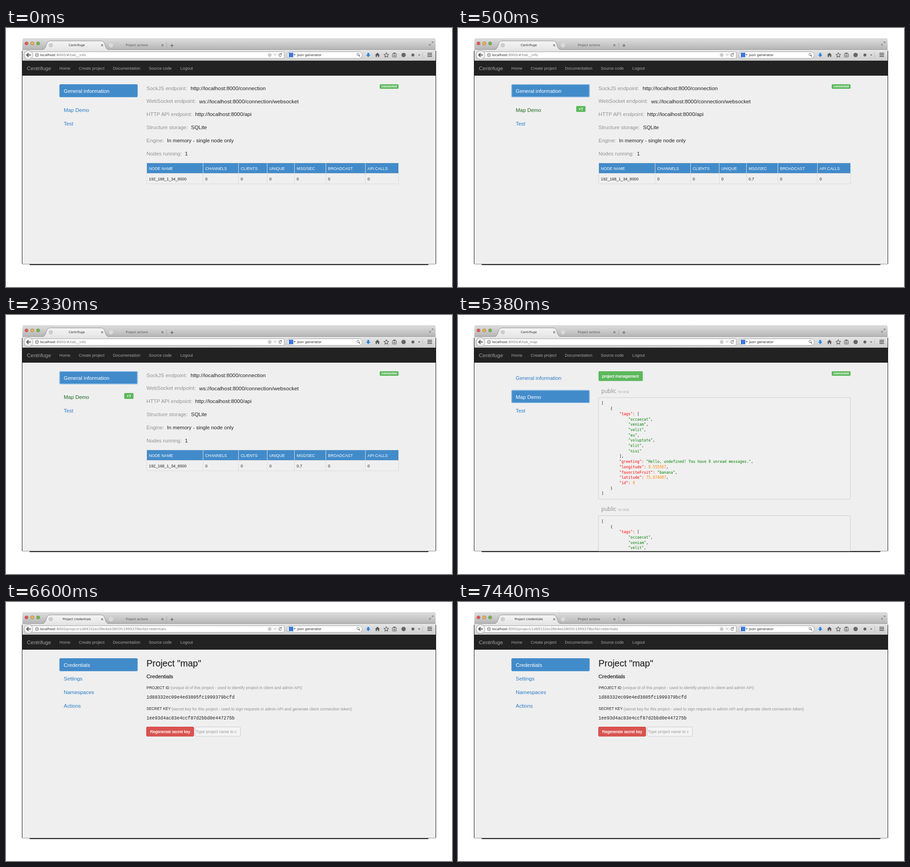
An HTML page for the animation above (8 s loop, 981 by 571 pixels).

```html
<!DOCTYPE html>
<html lang="en">
<meta charset="utf-8">
<title>Centrifuge admin</title>
<style>
  html, body { margin: 0; width: 100%; height: 100%; overflow: hidden; background: #fff; }
  svg { display: block; width: 981px; height: 571px; }
  text { white-space: pre; }
  .sans { font-family: "Liberation Sans", Arial, sans-serif; }
  .ui { font-family: "DejaVu Sans", sans-serif; }
  .head { font-family: "Open Sans", sans-serif; }
  .code { font-family: "DejaVu Sans Mono", monospace; }
  .key { font-family: "Liberation Mono", monospace; }
  .bold { font-weight: bold; }
  .medium { stroke: currentColor; stroke-width: .25; }
</style>
<svg viewBox="0 0 981 571">
  <defs>
    <linearGradient id="strip" x2="0" y2="1"><stop stop-color="#dedede"/><stop offset="1" stop-color="#b4b4b4"/></linearGradient>
    <linearGradient id="bar" x2="0" y2="1"><stop stop-color="#e6e6e6"/><stop offset="1" stop-color="#cecece"/></linearGradient>
    <linearGradient id="tab" x2="0" y2="1"><stop stop-color="#f4f4f4"/><stop offset="1" stop-color="#e6e6e6"/></linearGradient>
    <clipPath id="page"><path d="M36 105H945V520.5H36Z"/></clipPath>
  </defs>
  <g id="chrome"></g>
  <g id="view" clip-path="url(#page)"></g>
  <g id="address"></g>
</svg>
<script>
const BLUE = '#428bca', LINK = '#2a7cc7', GREEN = '#5cb85c', DARK = '#222', GREY = '#929292';
const STARTS = [0, 500, 3550, 6600], LOOP = 8000;

// y is the middle of the capital letters
const text = (str, x, y, size, color = DARK, cls = 'sans', anchor = 'start') =>
  `<text class="${cls}" x="${x}" y="${y + size * .36}" font-size="${size}" fill="${color}" color="${color}" text-anchor="${anchor}">${str}</text>`;
const rect = (x, y, w, h, fill, r = 0, stroke = 'none') =>
  `<rect x="${x}" y="${y}" width="${w}" height="${h}" rx="${r}" fill="${fill}" stroke="${stroke}"/>`;
const circle = (x, y, r, fill, stroke = 'none') =>
  `<circle cx="${x}" cy="${y}" r="${r}" fill="${fill}" stroke="${stroke}" stroke-width=".8"/>`;
const line = (d, color, width = 1) => `<path d="${d}" fill="none" stroke="${color}" stroke-width="${width}"/>`;
const shape = (d, fill) => `<path d="${d}" fill="${fill}"/>`;

function chrome() {
  const lights = ['#ef5350', '#f3b63c', '#6abf45'];
  const nav = [['Home', 117.5], ['Create project', 160], ['Documentation', 235], ['Source code', 314], ['Logout', 383.5]];
  const closeTab = x => line(`M${x - 2} 36l4 4m0-4l-4 4`, '#777', 1.2);
  return shape('M36 48V27Q36 23 40 23H941Q945 23 945 27V48Z', 'url(#strip)')
    + line('M37 23.5H944', '#c9c9c9')
    + rect(36, 47, 909, 25, 'url(#bar)')
    + line('M36 47.5H945', '#979797')
    + shape('M80 48C91 47 86 28.5 97 28.5H209C221 28.5 215 47 226 48Z', 'url(#tab)')
    + line('M80 47.5C91 46.5 86 28.5 97 28.5H209C221 28.5 215 46.5 226 47.5', '#929292')
    + line('M353.5 32V45', '#aaa')
    + lights.map((c, i) => circle(45 + i * 12.8, 34, 3.6, c, '#8a6d62')).join('')
    + circle(98.5, 38, 4.8, '#cdcdcd') + circle(231, 38, 4.8, '#d9d9d9')
    + closeTab(211.5) + closeTab(344)
    + text('Project actions', 263.5, 38, 6.7, '#555', 'ui')
    + line('M361.5 38.5h7m-3.5-3.5v7', '#555', 1.2)
    + line('M931.5 38l3-3m1.5-1.5l3-3M931.5 35v3h3M936.500 30.500h3v3', '#777')
    // address field and its buttons
    + rect(55, 52.5, 557, 14.500, '#fff', 2, '#a5a5a5')
    + circle(49.5, 59.5, 9.8, '#f0f0f0', '#888')
    + line('M54.500 59.500H45.500m4-4l-4 4l4 4', '#555', 1.9)
    + circle(68, 59.5, 3.8, '#bbb', '#777') + line('M64.500 59.500h7M68 56v7', '#eee', .7)
    + circle(580, 59.500, 4.2, '#ccc')
    + line('M589 57.500h5.500l-2.700 4Z', '#aaa', .8)
    + line('M605.500 57.500a3 3 0 1 0 .5 3M606 55v3h-3', '#666', 1.1)
    + rect(618.5, 52.5, 165, 14.500, '#fff', 7, '#a5a5a5')
    + rect(622, 54.5, 10, 10, '#3f78d8')
    + shape('M633 58h4l-2 2.500Z', '#444')
    + text('json generator', 640, 59.500, 7.4, DARK, 'ui')
    + circle(774.3, 58.300, 2.5, 'none', '#444') + line('M776 60l2.500 2.700', '#444', 1.4)
    // toolbar icons
    + shape('M794.800 55h4v4h2.700l-4.700 5.200l-4.700-5.200h2.700Z', '#2584e0')
    + shape('M817 54.500l5.300 5h-1.500v4.500h-2.500v-3h-2.600v3h-2.500v-4.500h-1.500Z', '#5b5b5b')
    + line('M836.500 54.500l1.500 3.300l3.500.4l-2.600 2.400l.7 3.500l-3.100-1.700l-3.100 1.700l.7-3.500l-2.600-2.400l3.500-.4Z', '#555', 1.1)
    + rect(850, 56, 8.500, 8, 'none', 1, '#555') + rect(852, 54.500, 4.500, 2.500, '#555') + line('M852 59.500h4.500M852 61.700h4.500', '#555')
    + circle(874.500, 59.500, 4.8, '#666')
    + circle(895, 59.500, 3.2, '#666')
    + shape('M906.500 58.500h4.500l-2.200 2.700Z', '#555')
    + line('M916.500 53V66', '#bbb')
    + line('M927 55.700h10M927 59.200h10M927 62.700h10', '#555', 1.8)
    // page ground, navigation bar and window edge
    + rect(36, 105, 909, 416, '#efefef')
    + rect(36, 72, 909, 33, DARK) + line('M36 104.500H945', '#111')
    + text('Centrifuge', 46, 89, 11.5, '#a2a2a2')
    + nav.map(([label, x]) => text(label, x, 89, 9, '#a2a2a2')).join('')
    + line('M35.500 50V520M945.500 50V520', '#111')
    + line('M36 520.500H53M928 520.500H945', '#777', .8)
    + line('M52 521.500H929', '#000', 2);
}

function menu(items, active, focused) {
  return items.map(([label, y, color = LINK]) => {
    const on = label === active, top = y - 15;
    return (on ? rect(117.500, top, 172, 28.500, BLUE, 2.5) : '')
      + (on && focused ? rect(118.300, top + .8, 170.400, 26.900, 'none', 2, '#9cc8ee') : '')
      + text(label, 127, y, 11.45, on ? '#fff' : color);
  }).join('');
}

const connected = rect(822, 124, 41.500, 10, GREEN, 2) + text('connected', 842.700, 128.700, 6.8, '#fff', 'sans bold', 'middle');

function info(updated) {
  const rows = [
    ['SockJS endpoint:', 'http://localhost:8000/connection', 406, 11.75],
    ['WebSocket endpoint:', 'ws://localhost:8000/connection/websocket', 425, 11.75],
    ['HTTP API endpoint:', 'http://localhost:8000/api', 416, 11.75],
    ['Structure storage:', 'SQLite', 407, 11.45],
    ['Engine:', 'In memory - single node only', 354, 11.45],
    ['Nodes running:', '1', 393.500, 11.45]
  ];
  const table = [
    ['NODE NAME', '192_168_1_34_8000', 309], ['CHANNELS', 0, 433], ['CLIENTS', 0, 511], ['UNIQUE', 0, 574],
    ['MSG/SEC', updated ? 0.7 : 0, 634], ['BROADCAST', 0, 703], ['API CALLS', 0, 790]
  ];
  const items = [['General information', 139], ['Map Demo', 180.500, updated ? '#1b691f' : LINK], ['Test', 210.500]];
  return menu(items, 'General information', updated) + connected
    + (updated ? rect(260, 172, 20.500, 13, GREEN, 2) + text('+7', 270.200, 178.500, 8.5, '#fff', 'sans bold', 'middle') : '')
    + rows.map(([label, value, x, size], i) =>
        text(label, 309, 132.500 + i * 28.8, 11.45, GREY) + text(value, x, 132.500 + i * 28.8, size)).join('')
    + rect(309, 297, 554.500, 24, BLUE)
    + table.map(([title, value, x]) => line(`M${x + .5} 297V344`, '#dcdcdc')
        + text(title, x + 5.3, 309.500, 8.75, '#fff') + text(value, x + 5.3, 333, 8.75)).join('')
    + line('M309 297.500H863.500M309 320.500H863.500M309 343.500H863.500M863.500 297V344', '#dcdcdc');
}

const message = [{
  tags: ['occaecat', 'veniam', 'velit', 'eu', 'voluptate', 'elit', 'nisi'],
  greeting: 'Hello, undefined! You have 6 unread messages.',
  longitude: 9.555567, favoriteFruit: 'banana', latitude: 75.074087, id: 0
}];

function highlight(row) {
  return row.replace(/("[^"]*":)|("[^"]*")|\b\d[\d.]*/g, (token, key, string) =>
    `<tspan fill="${key ? '#f00' : string ? '#008000' : '#ff8c00'}">${token}</tspan>`);
}

function messageBlock(y) {
  return text('public', 315, y, 11.7, '#8c8c8c', 'head') + text('10:14:52', 351.500, y + 2, 6.3, '#999', 'head')
    + rect(309, y + 14.500, 554, 224, '#f0f0f0', 2, '#ccc')
    + JSON.stringify(message, null, 4).split('\n')
        .map((row, i) => text(highlight(row), 315.500, y + 27 + i * 11.7, 8.17, DARK, 'code')).join('');
}

function messages() {
  return menu([['General information', 139], ['Map Demo', 180.500], ['Test', 210.500]], 'Map Demo', true) + connected
    + rect(309, 124, 97.500, 21.500, GREEN, 2) + text('project management', 317, 135, 8.9, '#fff', 'sans medium')
    + messageBlock(167.500) + messageBlock(428);
}

function credentials() {
  return menu([['Credentials', 139], ['Settings', 169], ['Namespaces', 199], ['Actions', 229]], 'Credentials')
    + text('Project "map"', 309, 135, 19.9, '#2b2b2b', 'sans medium" stroke-width="1')
    + text('Credentials', 309, 164, 11.6, DARK, 'sans medium')
    + text('PROJECT ID', 309, 189, 8.5)
    + text('(unique id of this project - used to identify project in client and admin API)', 362, 189, 8.96, GREY)
    + text('1d88332ec09e4ed3805fc1999379bcfd', 309, 209, 10.1, DARK, 'key')
    + text('SECRET KEY', 309, 235.300, 8.45)
    + text('(secret key for this project - used to sign requests in admin API and generate client connection token)', 364, 235.300, 8.9, GREY)
    + text('1ee93d4ac83e4ccf87d2bbd0e447275b', 309, 255, 10.1, DARK, 'key')
    + rect(309, 275.500, 104, 20.500, '#d9534f', 2, '#d0443f') + text('Regenerate secret key', 317, 286, 8.75, '#fff', 'sans medium')
    + rect(416.500, 275.500, 99, 20.500, '#f4f4f4', 1.5, '#ccc') + text('Type project name to c', 418, 286, 8.85, '#999');
}

const address = (title, path) => text(title, 155.700, 38, 6.7, DARK, 'ui', 'middle')
  + text(`localhost<tspan fill="#777">:8000/${path}</tspan>`, 75, 59.500, 7.53, DARK, 'ui');

const infoAddress = address('Centrifuge', '#/tab__info');
const scenes = [
  [info(false), infoAddress],
  [info(true), infoAddress],
  [messages(), address('Centrifuge', '#/tab_map')],
  [credentials(), address('Project credentials', 'project/1d88332ec09e4ed3805fc1999379bcfd/credentials')]
];

const byId = id => document.getElementById(id);
byId('chrome').innerHTML = chrome();
let current = -1;
const begin = performance.now();
function tick() {
  const t = (performance.now() - begin) % LOOP;
  const index = STARTS.filter(start => start <= t).length - 1;
  if (index !== current) {
    current = index;
    [byId('view').innerHTML, byId('address').innerHTML] = scenes[index];
  }
  requestAnimationFrame(tick);
}
tick();
</script>
</html>
```
